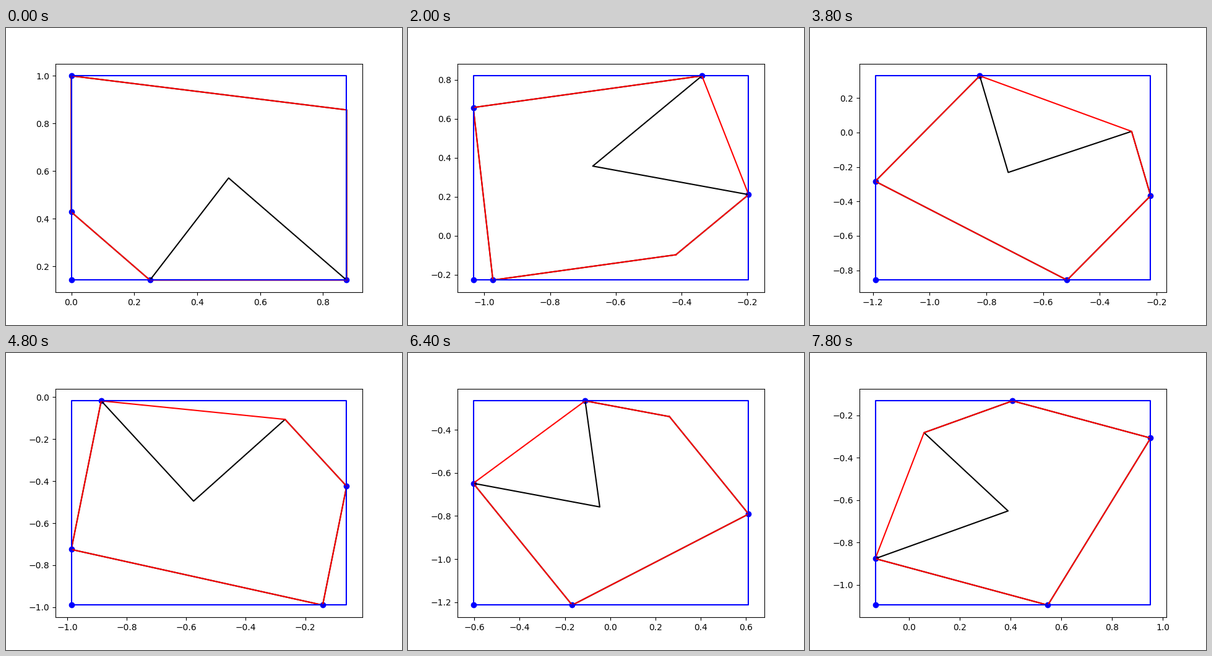
Write a matplotlib script that moves like this. It is 640x480 px and loops after 8000 ms.

```python
import numpy as np
import matplotlib.pyplot as plt
from matplotlib.animation import FuncAnimation

SHAPE = np.array([(0, 3/7), (1/4, 1/7), (1/2, 4/7), (7/8, 1/7), (7/8, 6/7), (0, 1)])
HULL = [0, 1, 3, 4, 5]          # every vertex except the notch
STEPS = sorted(str(k) for k in range(63))[:40]   # played in text order: 0, 1, 10, 11, ...
DOT_PAD = 3                     # pixels kept free for the dots

fig, ax = plt.subplots(figsize=(6.4, 4.8), dpi=100)


def rotate(points, angle):
    c, s = np.cos(angle), np.sin(angle)
    return points @ np.array([[c, s], [-s, c]])


def outline(points, color):
    ring = np.vstack([points, points[:1]])
    ax.plot(ring[:, 0], ring[:, 1], color=color, lw=1.5)


def limits(lo, hi, pixels):
    pad = DOT_PAD / pixels * 1.1
    pad += 0.05 * (1 + 2 * pad)
    return lo - pad * (hi - lo), hi + pad * (hi - lo)


def draw(i):
    ax.clear()
    pts = rotate(SHAPE, int(STEPS[i]) * 0.1)
    (x0, y0), (x1, y1) = pts.min(axis=0), pts.max(axis=0)

    outline(pts, "black")
    outline(pts[HULL], "red")
    outline(np.array([(x0, y0), (x0, y1), (x1, y1), (x1, y0)]), "blue")

    extremes = np.concatenate([pts.argmin(axis=0), pts.argmax(axis=0)])
    dots = np.vstack([pts[extremes], (x0, y0)])
    ax.scatter(dots[:, 0], dots[:, 1], color="blue")

    ax.set_xlim(limits(x0, x1, 496))
    ax.set_ylim(limits(y0, y1, 369.6))


anim = FuncAnimation(fig, draw, frames=len(STEPS), init_func=lambda: None,
                     interval=200, repeat=True, repeat_delay=0)
plt.show()
```
